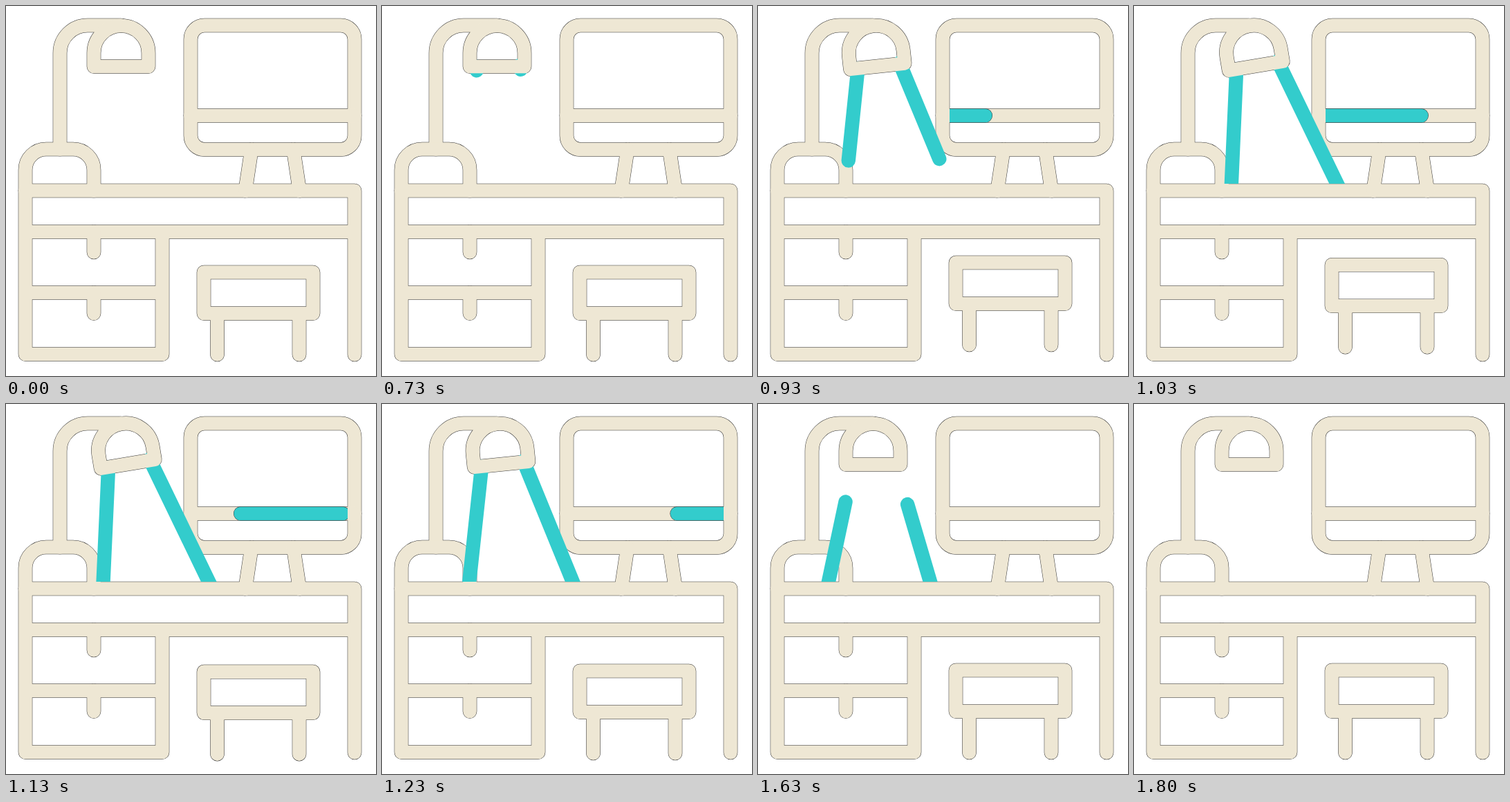
An HTML page for the animation above (2500 ms loop, 535 by 535 pixels).

```html
<!DOCTYPE html>
<html lang="en">
<head>
<meta charset="utf-8">
<title>Desk</title>
<style>
  html, body { margin: 0; width: 100%; height: 100%; overflow: hidden; background: #fff; }
  svg { display: block; width: 100%; height: 100%; fill: none; stroke-linecap: round; stroke-linejoin: round; }
  .edge { stroke: #333; stroke-width: 20.6; }
  .cream { stroke: #eee7d4; stroke-width: 19.6; }
  .teal { stroke: #3cc; stroke-width: 20.4; }
</style>
</head>
<body>
<svg viewBox="0 0 535 535">
  <defs>
    <g id="furniture">
      <path d="M78 207V68A40 40 0 0 1 118 28H166.5"/>
      <path d="M28 267V237A30 30 0 0 1 58 207H97A30 30 0 0 1 127 237V267"/>
      <path d="M28 267H504V504M28 326.5H504M28 267V503.5H226V326.5M28 414.5H226"/>
      <path d="M127 326.5V356M127 414.5V444.5"/>
      <rect x="267" y="28" width="237" height="179.5" rx="20"/>
      <path d="M267 158.5H504M355 207.5L346 267M415.5 207.5L424.5 267"/>
      <path id="stool" d="M286 385H444V444.5H286ZM305.5 444.5V504M424 444.5V504"/>
    </g>
    <path id="head" d="M127 87.5V68A39.5 39.5 0 0 1 206 68V87.5Z"/>
    <clipPath id="aboveDesk"><rect width="535" height="257"/></clipPath>
    <clipPath id="screen"><rect x="277" y="140" width="217" height="40"/></clipPath>
  </defs>
  <g class="edge">
    <use href="#furniture"/>
    <g class="swing"><use href="#head"/></g>
  </g>
  <use href="#furniture" class="cream"/>
  <g clip-path="url(#screen)">
    <path id="barEdge" class="edge"/>
    <path id="bar" class="teal" style="stroke-width:19.6"/>
  </g>
  <g clip-path="url(#aboveDesk)">
    <g class="swing"><path id="beams" class="teal"/></g>
  </g>
  <g class="swing cream"><use href="#head"/></g>
</svg>
<script>
const LOOP = 2500;
const byId = id => document.getElementById(id);
const swinging = document.querySelectorAll('.swing');

// Eased progress from 0 to 1 between two times
function ease(t, from, to) {
  const u = Math.min(1, Math.max(0, (t - from) / (to - from)));
  return u * u * (3 - 2 * u);
}

// Beam along x = x0 + slope * (y - 97); its tail follows its tip 800 ms later
function beam(t, x0, slope, top, length) {
  const point = start => {
    const y = top + length * ease(t, start, start + 500);
    return `${x0 + slope * (y - 97)} ${y}`;
  };
  return `M${point(1490)}L${point(690)}`;
}

function draw(t) {
  const angle = -10 * (ease(t, 730, 1080) - ease(t, 1080, 1420));
  swinging.forEach(g => g.setAttribute('transform', `rotate(${angle} 166.5 28)`));

  const lit = t >= 730 && t < 1800;
  byId('beams').setAttribute('d', lit
    ? beam(t, 136, -0.2125, 88, 276) + beam(t, 202, 0.294, 86, 305)
    : '');

  const tip = 267 + 237 * ease(t, 798, 1196);
  const tail = 267 + 237 * ease(t, 985, 1383);
  const bar = tip > tail ? `M${tail} 158.5H${tip}` : '';
  byId('bar').setAttribute('d', bar);
  byId('barEdge').setAttribute('d', bar);

  const hop = -15 * ease(t, 730, 970) + 19 * ease(t, 970, 1170) - 4 * ease(t, 1170, 1260);
  byId('stool').setAttribute('transform', `translate(0 ${hop})`);
}

const start = performance.now();
function tick() {
  draw((performance.now() - start) % LOOP);
  requestAnimationFrame(tick);
}
tick();
</script>
</body>
</html>
```
